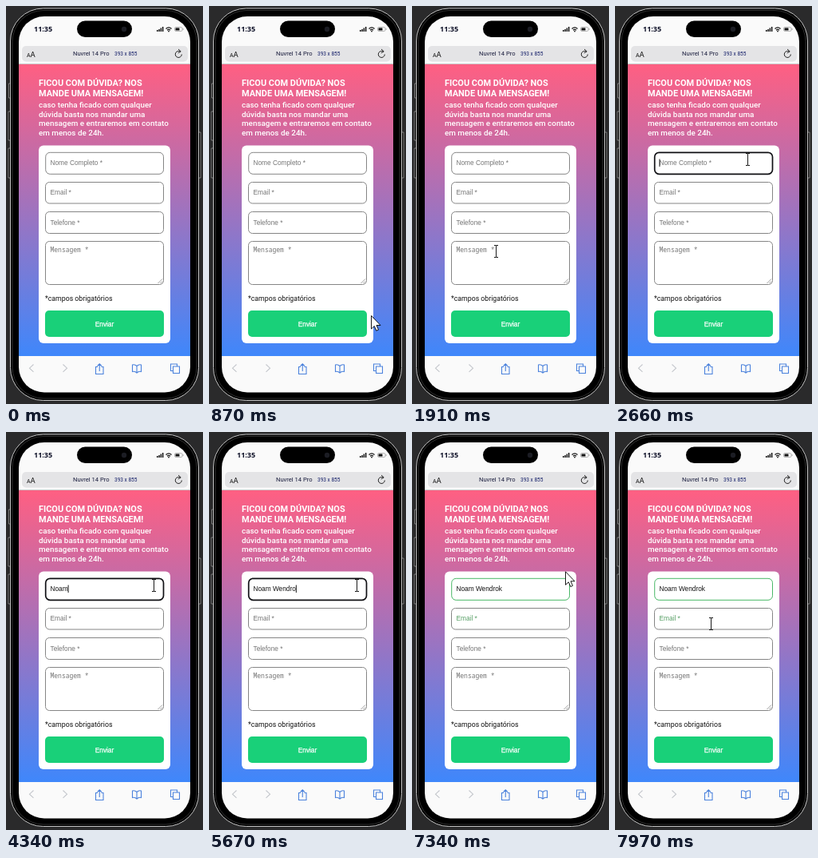
Write an HTML page that moves like this. It is 247 by 498 pixels and loops after 8000 ms.

```html
<!DOCTYPE html>
<html lang="pt-BR">
<head>
<meta charset="utf-8">
<title>Formulário de contato</title>
<style>
  html, body { margin: 0; width: 100%; height: 100%; overflow: hidden; background: #2a2a2b; }
  svg { display: block; width: 247px; height: 498px; }
  text { white-space: pre; }
  .ui { font-family: Roboto, sans-serif; }
  .clock { font: 700 9px "Noto Sans", sans-serif; }
  .form { font: 8.3px "Liberation Sans", Arial, sans-serif; }
  .mono { font: 8px "Noto Sans Mono", monospace; }
  .hint { fill: #757575; }
  .field { fill: #fff; stroke: #858585; stroke-width: 1; }
  .icon { fill: none; stroke: #4b82dc; stroke-width: 1.1; }
  .off { stroke: #c4c7cc; }
</style>
</head>
<body>
<svg viewBox="0 0 247 498">
  <defs>
    <linearGradient id="sky" x2="0" y2="1">
      <stop stop-color="#ff5f82"/><stop offset="1" stop-color="#3f87fb"/>
    </linearGradient>
    <clipPath id="screen"><rect x="16" y="13" width="215" height="470.500" rx="32"/></clipPath>
  </defs>

  <!-- Phone body -->
  <g fill="#111" stroke="#999" stroke-width=".8">
    <path d="M6 97H3.500V115H6M6 132H3V168H6M6 178H3V215H6M241 158H244V215H241"/>
    <rect x="5.500" y="3" width="236" height="490.500" rx="41" fill="#000" stroke="#c4c4c4" stroke-width="1"/>
    <rect x="8" y="5.500" width="231" height="485.500" rx="39" fill="#000" stroke="#3a3a3a"/>
  </g>

  <g clip-path="url(#screen)">
    <rect x="16" y="11" width="215" height="475" fill="#fafafa"/>
    <rect x="16" y="72" width="215" height="1" fill="#c9c4c6"/>
    <rect x="16" y="73" width="215" height="365" fill="url(#sky)"/>
  </g>

  <!-- Status and address bars -->
  <rect x="89" y="18.500" width="69" height="20.500" rx="10.250"/>
  <circle cx="148" cy="29" r="3.200" fill="#1c1d24"/>
  <g class="ui" fill="#111">
    <text class="clock" x="35" y="32" fill="#0c0f26">11:35</text>
    <path d="M189 30h1.500v2h-1.500zM191.300 29h1.500v3h-1.500zM193.600 27.500h1.500v4.500h-1.500zM195.900 26h1.500v6h-1.500z"/>
    <path d="M200.500 28.500q3.500-3.200 7 0M202 30.300q2-1.700 4 0" fill="none" stroke="#111" stroke-width="1.300"/>
    <circle cx="204" cy="31.600" r=".9"/>
    <rect x="211.500" y="26.500" width="9.500" height="5" rx="1.500" fill="none" stroke="#999" stroke-width=".7"/>
    <rect x="212.500" y="27.500" width="5" height="3" rx=".6"/>
    <rect x="221.600" y="28" width=".8" height="2" fill="#999"/>
    <rect x="20" y="50" width="208" height="19.500" rx="5" fill="#e4e4e6"/>
    <text x="26" y="63.500" font-size="7">A</text>
    <text x="30.500" y="63.500" font-size="9.500">A</text>
    <text x="84" y="62" font-size="7.600" fill="#16193a">Nuvrel 14 Pro</text>
    <text x="136" y="62" font-size="6.500" fill="#16206a">393 x 855</text>
    <path d="M219 57.500A4 4 0 1 0 220.300 60.500M216 54l3.200 2.800-3.400 2" fill="none" stroke="#222"/>
  </g>

  <!-- Page -->
  <g class="ui" fill="#fff">
    <g font-size="10.950" font-weight="700">
      <text x="41" y="100">FICOU COM DÚVIDA? NOS</text>
      <text x="41" y="113">MANDE UMA MENSAGEM!</text>
    </g>
    <g font-size="9.900" font-weight="500">
      <text x="41" y="127">caso tenha ficado com qualquer</text>
      <text x="41" y="138.700">dúvida basta nos mandar uma</text>
      <text x="41" y="150.400">mensagem e entraremos em contato</text>
      <text x="41" y="162">em menos de 24h.</text>
    </g>
    <rect x="41" y="174.500" width="165" height="247.500" rx="6"/>
    <text x="49" y="369" font-size="8.750" fill="#111">*campos obrigatórios</text>
  </g>
  <g class="form">
    <rect id="nameBox" class="field" x="49.700" y="183.300" width="147.800" height="27" rx="5.500"/>
    <rect class="field" x="49.500" y="220.500" width="148" height="26.500" rx="5"/>
    <rect class="field" x="49.500" y="257.500" width="148" height="27" rx="5"/>
    <rect class="field" x="49.500" y="294.500" width="148" height="54" rx="5"/>
    <path d="M190.500 347l5.500-5.500M193.500 347l2.500-2.500" stroke="#777" stroke-width=".7"/>
    <text id="nameHint" class="hint" x="55.500" y="199">Nome Completo *</text>
    <text id="nameText" x="55.500" y="199" fill="#111"></text>
    <text id="emailHint" class="hint" x="55.500" y="236">Email *</text>
    <text class="hint" x="55.500" y="274">Telefone *</text>
    <text class="hint mono" x="55.500" y="308">Mensagem *</text>
    <rect id="caret" y="191.500" width=".9" height="9.500"/>
    <rect x="49" y="381" width="149" height="33" rx="5" fill="#19d079"/>
    <text x="123.500" y="401" text-anchor="middle" fill="#fff" stroke="#fff" stroke-width=".25">Enviar</text>
  </g>

  <!-- Toolbar -->
  <path class="icon off" d="M34.500 448.500l-5 4.700 5 4.700M71.500 448.500l5 4.700-5 4.700"/>
  <path class="icon" d="M115 451.500h-2.500v9h9.500v-9h-2.500M117.250 457v-9M114.500 450.500l2.750-2.750 2.750 2.750"/>
  <path class="icon" d="M164 450.500q-2.500-2.500-5.500-1.500v8.500q3-1 5.500 1.500q2.500-2.500 5.500-1.500v-8.500q-3-1-5.500 1.500v8.500"/>
  <path class="icon" d="M209 456.500h-2.500v-8.500h8v2.500M209.500 451h8v8.500h-8z"/>

  <path id="arrow" d="M.5.5V17L4.300 13.500L6.800 19.300L9.500 18.100L7 12.500H12Z" fill="#fff" stroke="#000" stroke-width=".9"/>
  <path id="beam" d="M-3-7.500H-.8L-.5-7L-.2-7.500H2M-.5-7V7M-3 7.500H-.8L-.5 7L-.2 7.500H2" fill="none" stroke="#000" stroke-width=".9"/>
</svg>
<script>
const LOOP = 8000, STEP = 70;
const FOCUS = 2470, BLUR = 6940;
const NAME = "Noam Wendrok";
const KEY_TIMES = [3530, 3810, 3880, 4340, 4540, 4940, 5140, 5240, 5340, 5540, 5670, 5800];
const CARET_OFF = [[3000, 3530], [6330, 6830]];

// Pointer moves as [time, x, y]; it rests between one move and the next.
const MOVES = [
  [[590, 226, 480], [660, 222, 460], [800, 207, 405], [870, 203, 387], [1010, 204, 345], [1080, 203, 367]],
  [[1280, 201, 364], [1560, 180, 345], [1770, 125, 318], [1910, 106, 307], [2050, 107, 245]],
  [[2120, 108, 238], [2330, 115, 205], [2470, 130, 190], [2610, 167, 192], [2750, 186, 192]],
  [[6660, 190, 180], [6800, 203, 149], [6870, 203, 160]],
  [[7270, 201, 164], [7550, 165, 205], [7830, 126, 235], [7970, 121, 240]]
];
const FIELD_ROWS = [[182, 211], [220, 247], [257, 285], [294, 349]];

const el = id => document.getElementById(id);
const show = (node, on) => node.setAttribute("visibility", on ? "visible" : "hidden");
const nameBox = el("nameBox"), nameHint = el("nameHint"), nameText = el("nameText");
const emailHint = el("emailHint"), caret = el("caret"), arrow = el("arrow"), beam = el("beam");

function pointerAt(time) {
  const move = MOVES.filter(m => m[0][0] <= time).pop();
  if (!move) return null;
  const start = move[0][0];
  const t = start + Math.floor((time - start) / STEP) * STEP;
  const next = move.findIndex(p => p[0] > t);
  if (next < 0) return move[move.length - 1].slice(1);
  const [t0, x0, y0] = move[next - 1], [t1, x1, y1] = move[next];
  const k = (t - t0) / (t1 - t0);
  return [x0 + (x1 - x0) * k, y0 + (y1 - y0) * k];
}

function drawPointer(time) {
  const p = pointerAt(time);
  const overField = p && p[0] > 49 && p[0] < 198 &&
    FIELD_ROWS.some(([top, bottom]) => p[1] >= top && p[1] <= bottom);
  show(arrow, p && !overField);
  show(beam, overField);
  if (p) (overField ? beam : arrow).setAttribute("transform", `translate(${p})`);
}

function drawForm(time) {
  const focused = time >= FOCUS && time < BLUR;
  const done = time >= BLUR;
  const typed = NAME.slice(0, KEY_TIMES.filter(k => k <= time).length);
  nameBox.style.stroke = focused ? "#101014" : done ? "#48b866" : "";
  nameBox.style.strokeWidth = focused ? 1.7 : "";
  emailHint.style.fill = done ? "#58a066" : "";
  if (nameText.textContent !== typed) nameText.textContent = typed;
  show(nameHint, !typed);
  show(caret, focused && !CARET_OFF.some(([from, to]) => time >= from && time < to));
  caret.setAttribute("x", 55.5 + (typed ? nameText.getComputedTextLength() : 0));
}

function frame() {
  const time = performance.now() % LOOP;
  drawForm(time);
  drawPointer(time);
  requestAnimationFrame(frame);
}
frame();
</script>
</body>
</html>
```
